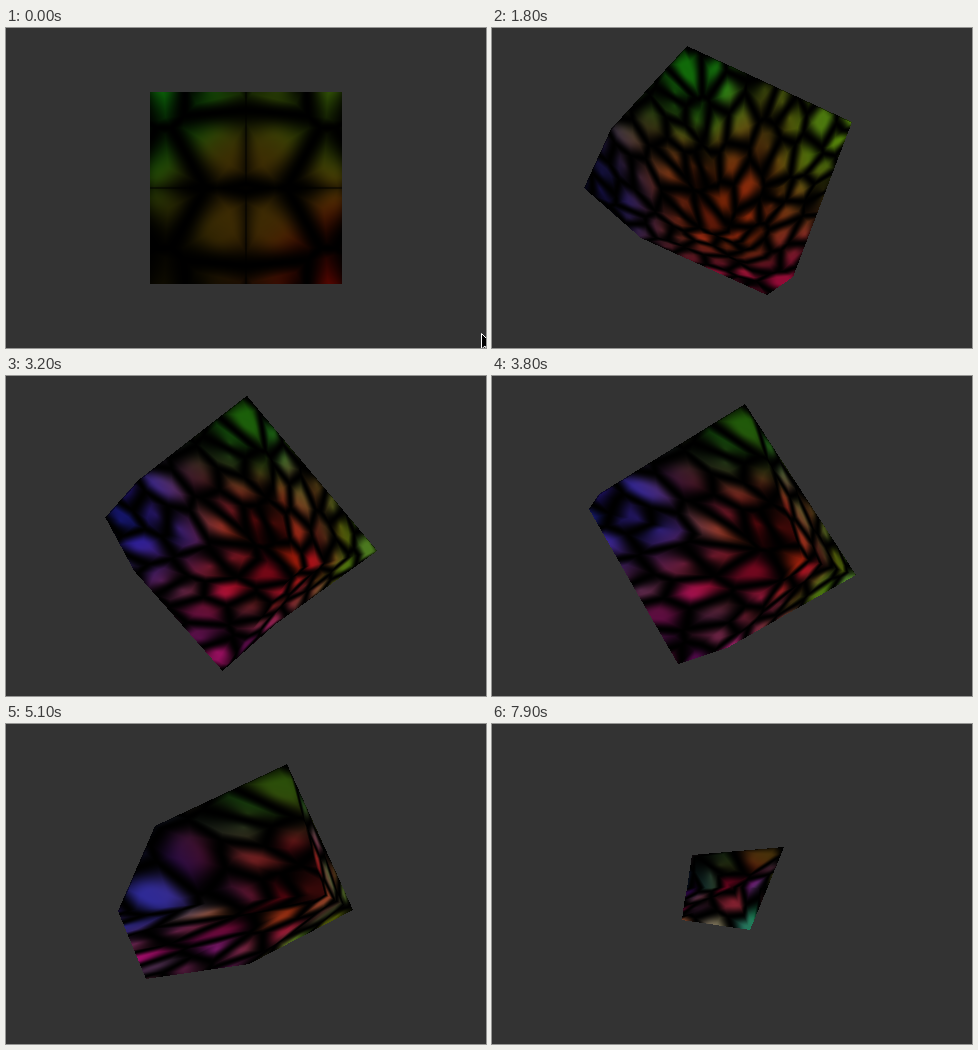
Write an HTML page with a canvas that moves like this. It is 480 by 320 pixels and loops after 8000 ms.

```html
<!DOCTYPE html>
<html>
<head>
<meta charset="utf-8">
<style>
  html, body { margin: 0; width: 100%; height: 100%; overflow: hidden; background: #333; }
  canvas { display: block; }
</style>
</head>
<body>
<canvas width="480" height="320"></canvas>
<script>
const W = 480, H = 320, LOOP = 8000, STEP = 100;
const ctx = document.querySelector('canvas').getContext('2d');

const clamp = (x, lo, hi) => Math.min(hi, Math.max(lo, x));
const mix = (a, b, k) => a + (b - a) * k;
const smooth = (lo, hi, x) => { const k = clamp((x - lo) / (hi - lo), 0, 1); return k * k * (3 - 2 * k); };

// The solid only turns in these spans and rests between them.
const moving = [[500, 3200], [3300, 4200], [4700, 5300], [5600, 6100], [6300, 6500], [7200, 7900]];
const movingTime = t => moving.reduce((sum, [a, b]) => sum + clamp(t, a, b) - a, 0);

// Inner corner, then the outline: A, B, bend, E, bend, D, bend.
const pose = (time, points) => ({ at: movingTime(time), points: points.split(/[ ,]/).map(Number) });
const poses = [
  pose(500, '240,160 144,64 336,64 336,160 336,256 240,256 144,256 144,160'),
  pose(1800, '235,203 195,18 360,94 301,249 275,267 149,210 92,160 119,101'),
  pose(2600, '262,205 226,12 376,137 313,217 251,295 114,181 103,160 165,86'),
  pose(3800, '310,182 253,28 364,199 235,272 186,288 141,210 97,133 107,118'),
  pose(5100, '318,170 281,40 347,186 243,240 140,255 126,221 112,187 149,102'),
  pose(6100, '310,160 323,111 344,157 232,219 170,220 175,196 180,172 190,125'),
  pose(7900, '240,163 292,123 275,165 258,206 190,196 192,180 195,164 200,131'),
];

// Smooth curve through the poses.
function pointsAt(time) {
  const last = poses.length - 1;
  const i = clamp(poses.findLastIndex(p => p.at <= time), 0, last - 1);
  const [p, a, b, n] = [i - 1, i, i + 1, i + 2].map(j => poses[clamp(j, 0, last)]);
  const k = (time - a.at) / (b.at - a.at);
  return a.points.map((from, j) => {
    const to = b.points[j], leave = (to - p.points[j]) / 2, arrive = (n.points[j] - from) / 2;
    return mix(from, to, k * k * (3 - 2 * k)) + k * (1 - k) * (leave * (1 - k) - arrive * k);
  });
}

function hash(x, y, seed) {
  const s = Math.sin(x * 127.1 + y * 311.7 + seed * 74.7) * 43758.5453;
  return s - Math.floor(s);
}

// Nearest cell, and a shade that is zero along its borders and full near its middle.
function cellAt(x, y) {
  const cx = Math.floor(x), cy = Math.floor(y);
  let near = 9, next = 9, id;
  for (let j = cy - 1; j <= cy + 1; j++) {
    for (let i = cx - 1; i <= cx + 1; i++) {
      const d = Math.hypot(i + .1 + .8 * hash(i, j, 1) - x, j + .1 + .8 * hash(i, j, 2) - y);
      if (d < near) { next = near; near = d; id = [i, j]; } else if (d < next) next = d;
    }
  }
  return { id, shade: smooth(0, .85, next - near) };
}

// Each corner has a colour; blue and the red middle appear as the solid turns.
function cornerColours(progress) {
  const turned = smooth(.05, .4, progress);
  return [
    { u: -.5, v: -.5, rgb: [20, 180, 15] },
    { u: .5, v: -.5, rgb: [90, 150, 10] },
    { u: .5, v: .5, rgb: [160, 10, 110 * turned] },
    { u: -.5, v: .5, rgb: [25, 20, 190 * turned] },
    { u: 0, v: 0, rgb: [mix(100, 190, turned), mix(70, 10, turned), 5] },
  ];
}

function blend(colours, u, v) {
  const sum = [0, 0, 0];
  let total = 0;
  for (const c of colours) {
    const w = ((u - c.u) ** 2 + (v - c.v) ** 2 + .01) ** -1.5;
    c.rgb.forEach((value, n) => sum[n] += w * value);
    total += w;
  }
  return sum.map(value => value / total);
}

// A bend keeps its share of the edge length in texture space too.
function bend(a, b, point) {
  const da = Math.hypot(point.x - a.x, point.y - a.y);
  const db = Math.hypot(point.x - b.x, point.y - b.y);
  const k = da / (da + db || 1);
  return { ...point, u: mix(a.u, b.u, k), v: mix(a.v, b.v, k) };
}

function fillTriangle(a, b, c, shadePixel) {
  const area = (b.x - a.x) * (c.y - a.y) - (c.x - a.x) * (b.y - a.y);
  if (Math.abs(area) < 1) return;
  const xs = [a.x, b.x, c.x], ys = [a.y, b.y, c.y];
  for (let y = Math.floor(Math.min(...ys)); y < Math.max(...ys); y++) {
    for (let x = Math.floor(Math.min(...xs)); x < Math.max(...xs); x++) {
      const px = x + .5 - a.x, py = y + .5 - a.y;
      const kb = (px * (c.y - a.y) - (c.x - a.x) * py) / area;
      const kc = ((b.x - a.x) * py - px * (b.y - a.y)) / area;
      if (kb < 0 || kc < 0 || kb + kc > 1) continue;
      shadePixel(x, y, a.u + kb * (b.u - a.u) + kc * (c.u - a.u),
                       a.v + kb * (b.v - a.v) + kc * (c.v - a.v));
    }
  }
}

function drawSolid(time) {
  const progress = time / movingTime(LOOP);
  const cells = 3.2 + 4.6 * Math.sin(Math.PI * Math.sqrt(progress));
  const shift = Math.min(.5, 2.2 * progress);   // slides the mirror axes out to the edges
  const variety = .7 * progress ** 2;
  const colours = cornerColours(progress);

  const p = pointsAt(time);
  const point = (i, u, v) => ({ x: p[2 * i], y: p[2 * i + 1], u, v });
  const centre = point(0, 0, 0);
  const A = point(1, -.5, -.5), B = point(2, .5, -.5), E = point(4, .5, .5), D = point(6, -.5, .5);
  const rim = [A, B, bend(B, E, point(3)), E, bend(E, D, point(5)), D, bend(D, A, point(7))];
  const image = ctx.getImageData(0, 0, W, H);

  rim.forEach((corner, i) => fillTriangle(centre, corner, rim[(i + 1) % rim.length], (x, y, u, v) => {
    const fx = Math.abs(u + shift), fy = Math.abs(v + shift);
    const { id, shade } = cellAt(fx * cells, fy * cells);
    const seam = Math.min(fx, fy) < .003 ? .55 : 1;
    const light = seam * shade * mix(.6, 1, hash(...id, 3));
    const at = 4 * (y * W + x);
    blend(colours, u, v).forEach((value, n) => {
      image.data[at + n] = light * mix(value, 190 * hash(...id, 4 + n), variety);
    });
  }));
  ctx.putImageData(image, 0, 0);
}

function drawCursor() {
  ctx.fillStyle = '#000';
  ctx.strokeStyle = '#fff';
  const arrow = new Path2D('M475.5 305.5V321L479 318L482 324L487 317Z');
  ctx.fill(arrow);
  ctx.stroke(arrow);
}

const start = performance.now();
let shown = -1;

function frame() {
  const t = Math.floor((performance.now() - start) % LOOP / STEP) * STEP;
  if (t !== shown) {
    shown = t;
    ctx.fillStyle = '#333';
    ctx.fillRect(0, 0, W, H);
    drawSolid(movingTime(t));
    if (t < STEP) drawCursor();
  }
  requestAnimationFrame(frame);
}
frame();
</script>
</body>
</html>
```
